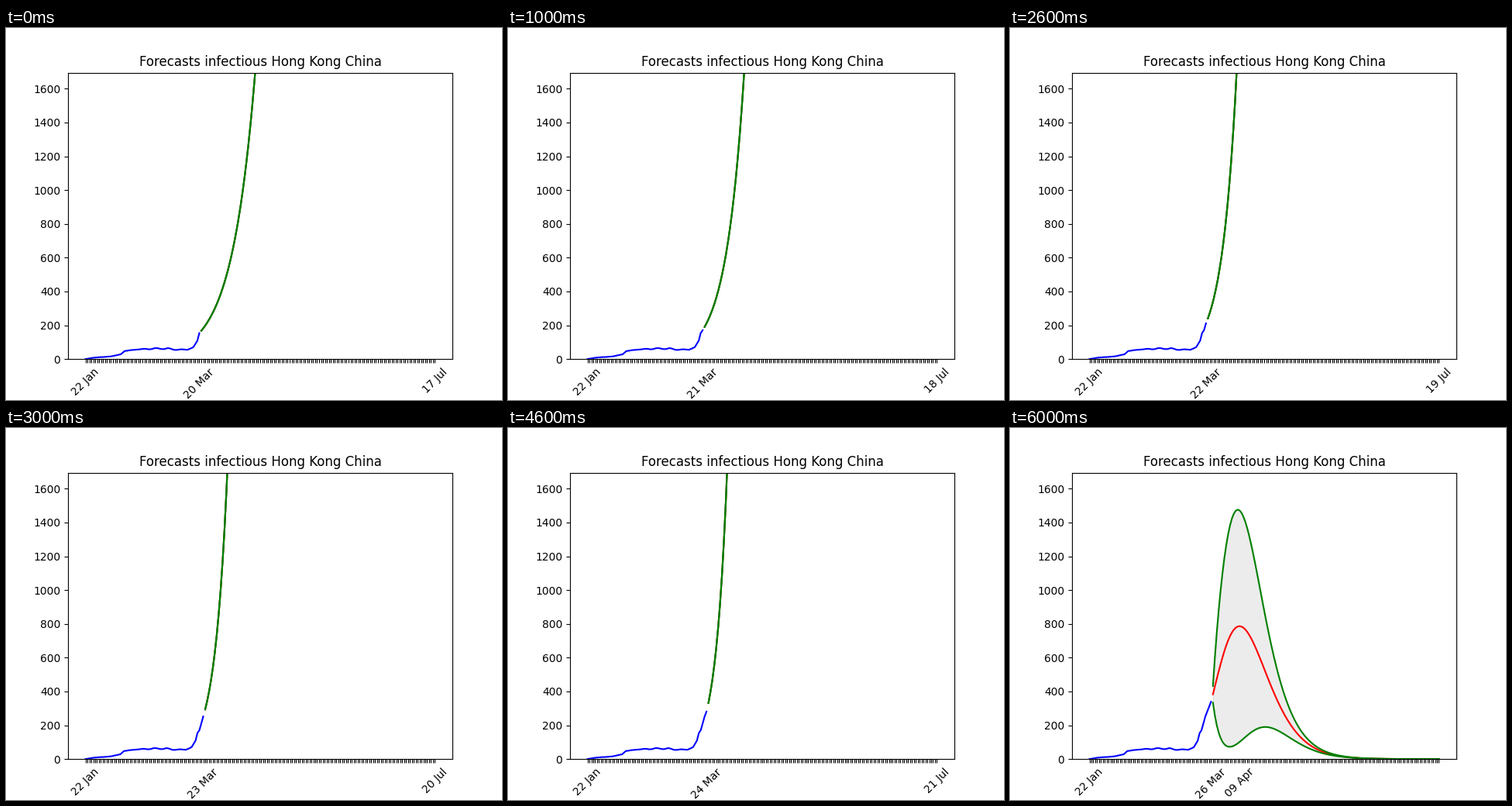
Recreate the animation shown at these times as a matplotlib script. Size 640 by 480 pixels, loop 7000 ms.

```python
import numpy as np
import matplotlib.pyplot as plt
from matplotlib.animation import FuncAnimation

START = np.datetime64("2020-01-22")
FIRST_END = 58
UPDATES = 7
HORIZON = 120
RECOVERY = 0.109


def observed():
    """Daily cases: a few turning points plus a wobble on the plateau."""
    day = np.arange(FIRST_END + UPDATES)
    turns = [0, 4, 13, 18, 20, 26, 35, 42, 46, 52, 55, 57, 58, 59, 61, 64]
    cases = [0, 8, 16, 28, 48, 57, 62, 62, 56, 56, 70, 109, 154, 171, 252, 339]
    wobble = np.cos(2 * np.pi * (day - 36) / 6.5)
    fade = np.exp(-((day - 39) / 12) ** 2)
    return np.round(np.interp(day, turns, cases) + 3.5 * wobble * fade)


def day_name(day):
    return (START + int(day)).item().strftime("%d %b")


def unchecked(level, t, i):
    """Pure exponential growth, faster with each update."""
    rate = 0.0844 + i * (0.0238 - 0.00054 * (i - 1.7) ** 2)
    return level * np.exp(rate * t), np.zeros(len(t))


def damped(level, t, peak, decay, height, fade, power):
    """Growth with a decaying contact rate, and the half width of its band."""
    contacts = np.exp(decay * peak) * (1 - np.exp(-decay * t)) / decay
    mean = level * np.exp(RECOVERY * (contacts - t))
    spread = height * (1 - np.exp(-(t - 0.63) / 2.55))
    return mean, mean * spread / (1 + (t / fade) ** power)


def forecast(level, t, i):
    """Return the peak day, the mean curve and its band's half width."""
    if i < UPDATES - 2:
        return HORIZON, *unchecked(level, t, i)
    if i == UPDATES - 2:
        peak, shape = 42, dict(decay=0.0212, height=1.9, fade=148, power=5.4)
    else:
        peak, shape = 15, dict(decay=0.052, height=0.95, fade=36.8, power=2.73)
    return peak, *damped(level, t, peak, **shape)


active = observed()
fig, ax = plt.subplots(figsize=(6.4, 4.8), dpi=100)


def draw(i):
    ax.clear()
    end = FIRST_END + i
    total = end + HORIZON
    t = np.arange(1, HORIZON + 1)
    days = end + t
    peak, mean, half = forecast(active[end], t, i)

    ax.plot(np.arange(end + 1), active[:end + 1], color="blue")
    ax.plot(days, mean, color="red")
    for bound in (mean - half, mean + half):
        ax.plot(days, bound, color="green")
    if half.any():
        ax.fill_between(days, mean - half, mean + half,
                        color="gray", alpha=0.15)

    # The peak's date counts from the last observed day.
    labels = [""] * (total + 1)
    labels[0] = day_name(0)
    labels[end] = day_name(end)
    labels[end + peak] = day_name(end + peak - 1)
    ax.set_xticks(range(total + 1), labels, rotation=45)
    ax.set_xlim(-0.05 * total, 1.05 * total)
    ax.set_ylim(0, 5 * active.max())
    ax.set_title("Forecasts infectious Hong Kong China")
    return []


anim = FuncAnimation(fig, draw, frames=UPDATES, interval=1000,
                     init_func=lambda: draw(0), repeat=True, repeat_delay=0)
plt.show()
```
